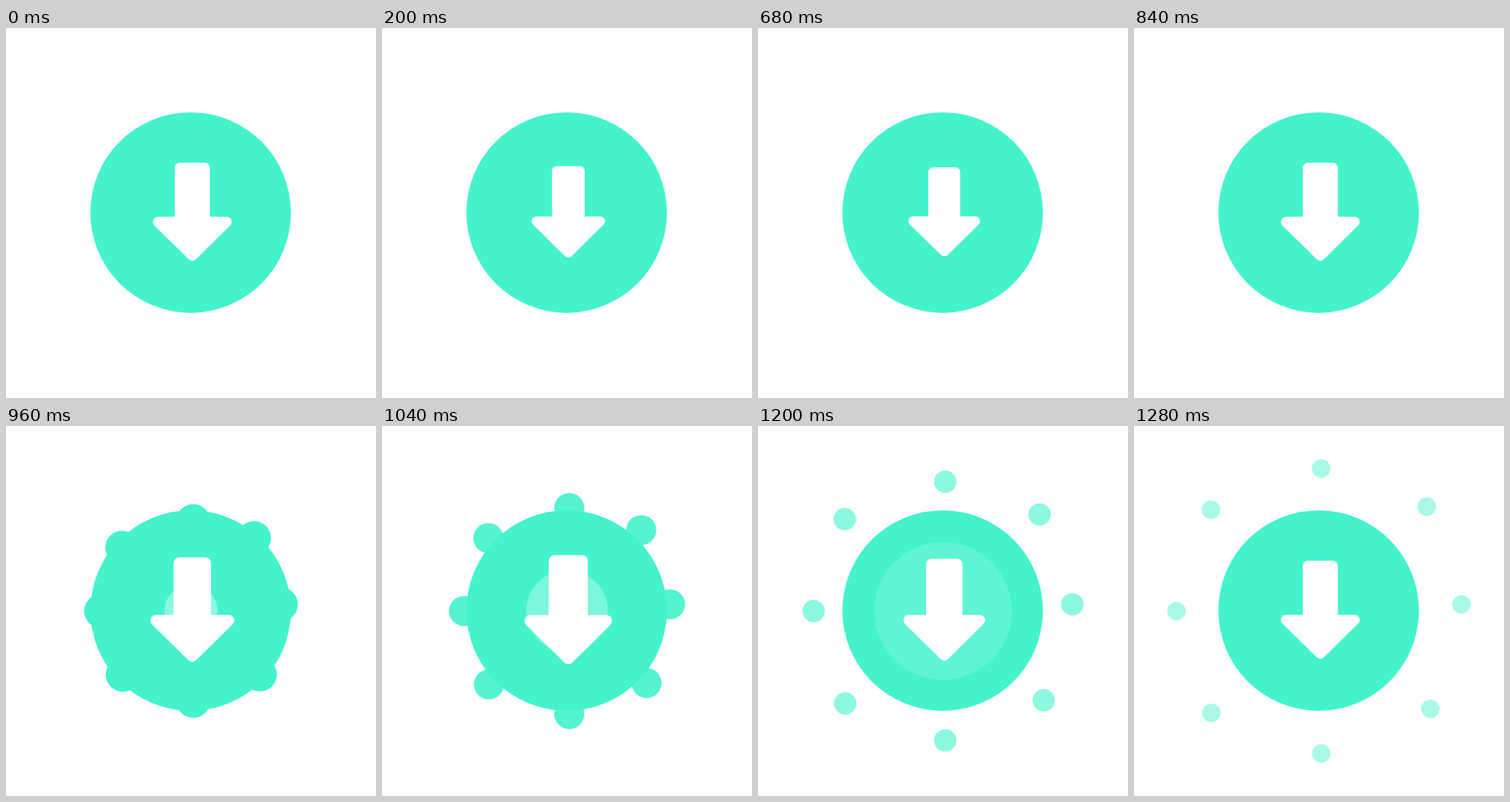
An HTML page for the animation above (1320 ms loop, 500x500 px).

```html
<!DOCTYPE html>
<html>
<head>
<meta charset="utf-8">
<style>
  html, body { margin: 0; height: 100%; overflow: hidden; background: #fff; }
  svg { display: block; width: 100vw; height: 100vh; }
</style>
</head>
<body>
<svg viewBox="0 0 500 500" fill="#44f3cc">
  <g id="dots"></g>
  <circle cx="249.5" cy="249.4" r="135.5"/>
  <circle id="ripple" cx="250" cy="250" fill="#fff"/>
  <path id="arrow" fill="#fff" stroke="#fff" stroke-width="14" stroke-linejoin="round"
    d="M235 189H268.5V262H298L251.8 307.5L205.5 262H235Z"/>
</svg>
<script>
const LOOP = 1320, STEP = 40, CENTER = 250;
const SHRUNK = 520, GROWN = 1040, SETTLED = 1280;
const $ = id => document.getElementById(id);
const set = (el, attrs) => { for (const k in attrs) el.setAttribute(k, attrs[k]); };

// Linear ramp from a to b between two times, held outside them
const ramp = (t, t0, t1, a, b) =>
  a + (b - a) * Math.min(1, Math.max(0, (t - t0) / (t1 - t0)));

// Slightly uneven burst: heading in degrees and sideways shift of each ray
const rays = [[0, -9], [39, 8], [90, -3], [136, 2], [180, 0], [224, -3], [270, 3], [325, -32]];
const dots = rays.map(([heading, shift], i) => {
  const el = document.createElementNS('http://www.w3.org/2000/svg', 'circle');
  $('dots').append(el);
  const angle = heading * Math.PI / 180;
  return { el, shift, cos: Math.cos(angle), sin: Math.sin(angle), reach: i % 2 ? 1.04 : 1 };
});

function drawArrow(t) {
  const scale = t < SHRUNK ? ramp(t, 0, SHRUNK, 1, .82)
    : t < GROWN ? ramp(t, SHRUNK, GROWN, .82, 1.11)
    : ramp(t, GROWN, SETTLED, 1.11, 1);
  set($('arrow'), { transform: `translate(251.6 249.6) scale(${scale}) translate(-251.6 -249.6)` });
}

function drawRipple(t) {
  set($('ripple'), {
    r: ramp(t, 808, SETTLED, 0, 112),
    opacity: .36 * ramp(t, 960, SETTLED, 1, 0) ** .65,
  });
}

function drawDots(t) {
  const distance = ramp(t, 800, SETTLED, 86, 192.5);
  const r = ramp(t, 800, SETTLED, 28.1, 12.5);
  const opacity = ramp(t, 992, SETTLED, 1, .46);
  set($('dots'), { opacity: t < 800 ? 0 : 1 });
  for (const { el, shift, cos, sin, reach } of dots) {
    const d = distance * reach;
    set(el, { cx: CENTER + d * cos - shift * sin, cy: CENTER + d * sin + shift * cos, r, opacity });
  }
}

const start = performance.now();
function tick() {
  const t = Math.floor((performance.now() - start) % LOOP / STEP) * STEP;
  drawArrow(t);
  drawRipple(t);
  drawDots(t);
  requestAnimationFrame(tick);
}
tick();
</script>
</body>
</html>
```
